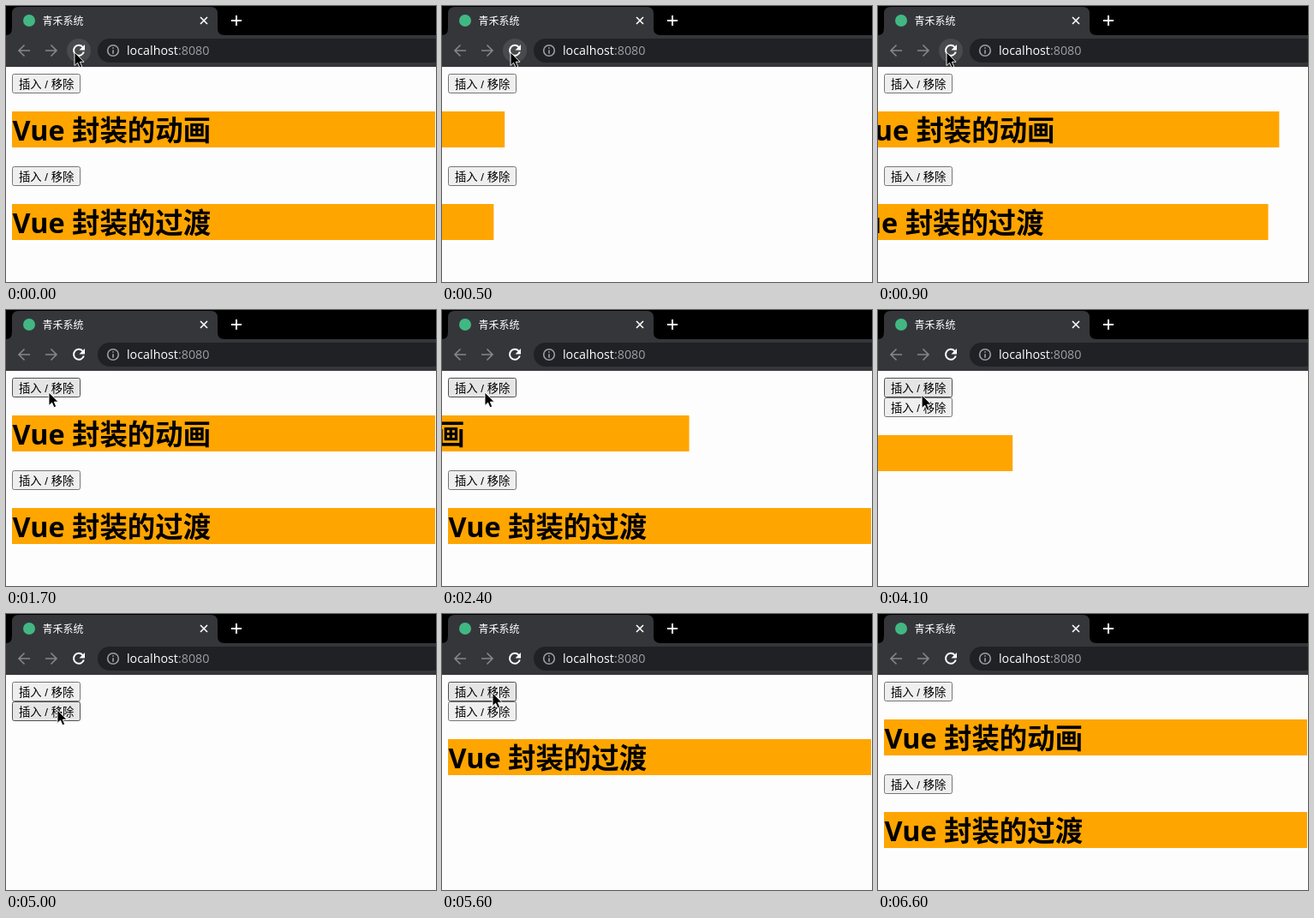
An HTML page that plays this animation: 502x322 px, repeating every 7000 ms.

```html
<!DOCTYPE html>
<html lang="zh">
<head>
<meta charset="utf-8">
<title>Vue</title>
<style>
  html, body { margin: 0; width: 100%; height: 100%; overflow: hidden; background: #fdfdfd; }
  svg { display: block; width: 502px; height: 322px; }
  text { font-family: "Open Sans", "Noto Sans CJK SC", "Noto Sans CJK", sans-serif; white-space: pre; }
  .icon { fill: none; stroke: #fff; stroke-width: 2; }
  .thin { stroke-width: 1.6; }
  .dim { stroke: #85868a; }
  .info { stroke: #9aa0a6; }
  .button rect { fill: #efefef; stroke: #767676; }
  .button.hover rect { fill: #e5e5e5; stroke: #4f4f4f; }
  .button text { font: 13.333px "Liberation Sans", "Noto Sans CJK SC", "Noto Sans CJK", sans-serif; }
  .banner rect { fill: #ffa500; }
  .banner text { font-size: 32.4px; font-weight: bold; }
</style>
</head>
<body>
<svg viewBox="0 0 502 322">
  <g id="firstBanner" class="banner"><rect width="494" height="42"/><text x=".5" y="33.5">Vue 封装的动画</text></g>
  <g id="secondBanner" class="banner"><rect width="494" height="42"/><text x=".5" y="33.5">Vue 封装的过渡</text></g>
  <g id="firstButton" class="button"><rect x=".5" y=".5" width="79" height="22" rx="2"/><text x="8" y="16.5">插入 / 移除</text></g>
  <g id="secondButton" class="button"><rect x=".5" y=".5" width="79" height="22" rx="2"/><text x="8" y="16.5">插入 / 移除</text></g>

  <rect width="502" height="34"/>
  <path d="M0 71V34Q7 34 7 26V9Q7 1 15 1H239Q247 1 247 9V26Q247 34 255 34H502V71Z" fill="#35363a"/>
  <circle cx="27" cy="17" r="7" fill="#41b883"/>
  <text x="42.5" y="21.5" font-size="12" fill="#fff">青禾系统</text>
  <path class="icon thin" d="M227 13l8 8m0-8l-8 8"/>
  <path class="icon" d="M263 17h12m-6-6v12"/>

  <path class="icon thin dim" d="M28 52H15m6.5-6.5L15 52l6.5 6.5M46 52h13m-6.5-6.5L59 52l-6.5 6.5"/>
  <circle id="reloadGlow" cx="85" cy="52" r="14" fill="#494a4d"/>
  <path class="icon" d="M89.5 47.8A6 6 0 1 0 90.8 53.5"/>
  <path d="M92 45v6.5h-6.5z" fill="#fff"/>
  <rect x="107" y="38" width="420" height="28" rx="14" fill="#202124"/>
  <circle class="icon thin info" cx="125" cy="52" r="6.3"/>
  <path class="icon thin info" d="M125 48.2v1.6m0 1.4v4.6"/>
  <text x="141" y="57" font-size="14.3" font-weight="500" fill="#fff">localhost<tspan font-weight="400" fill="#9aa0a6">:8080</tspan></text>

  <path id="cursor" d="M0 0V15.5L3.6 12.2 6 17.8 8.7 16.6 6.3 11.2H11Z" stroke="#fff" stroke-width=".9"/>
</svg>
<script>
const LOOP = 7000, SLIDE = 500, WIDTH = 494, MOVE = 400;
const el = id => document.getElementById(id);
const clamp = p => Math.max(0, Math.min(1, p));
const ease = p => p * p * (3 - 2 * p);

// Page load shows each banner, then every click toggles it.
const firstToggles = [434, 2186, 5650];
const secondToggles = [447, 3753, 5054];

// Pointer stops after the reload button, by arrival time
const reload = { x: 80, y: 54 };
const stops = [
  { at: 1600, x: 50, y: 96 },
  { at: 3400, x: 68, y: 106 },
  { at: 4120, x: 51, y: 99 },
  { at: 5020, x: 60, y: 112 },
  { at: 5500, x: 59, y: 92 },
  { at: 6600, x: 520, y: 330 }
];

function bannerState(toggles, t) {
  const index = toggles.findLastIndex(start => start <= t);
  const p = index < 0 ? 1 : clamp((t - toggles[index]) / SLIDE);
  const entering = index !== 1;
  return { shown: entering || p < 1, x: 7 - WIDTH * (entering ? 1 - p : p) };
}

function pointerAt(t) {
  return stops.reduce((from, to) => {
    const p = ease(clamp((t - to.at) / MOVE + 1));
    return { x: from.x + (to.x - from.x) * p, y: from.y + (to.y - from.y) * p };
  }, reload);
}

const place = (node, x, y) => node.setAttribute("transform", `translate(${x} ${y})`);
const show = (node, on) => node.setAttribute("visibility", on ? "visible" : "hidden");

function drawButton(node, y, tip) {
  place(node, 7, y);
  node.classList.toggle("hover", tip.x >= 7 && tip.x < 87 && tip.y >= y && tip.y < y + 23);
}

function drawBanner(node, y, state) {
  place(node, state.x, y);
  show(node, state.shown);
}

function draw(now) {
  const t = now % LOOP;
  const tip = pointerAt(t);
  const first = bannerState(firstToggles, t);
  const second = bannerState(secondToggles, t);
  const secondTop = first.shown ? 187 : 102;

  drawButton(el("firstButton"), 79, tip);
  drawBanner(el("firstBanner"), 123, first);
  drawButton(el("secondButton"), secondTop, tip);
  drawBanner(el("secondBanner"), secondTop + 44, second);
  show(el("reloadGlow"), Math.hypot(tip.x - 85, tip.y - 52) < 14);
  place(el("cursor"), tip.x, tip.y);
  requestAnimationFrame(draw);
}
requestAnimationFrame(draw);
</script>
</body>
</html>
```
